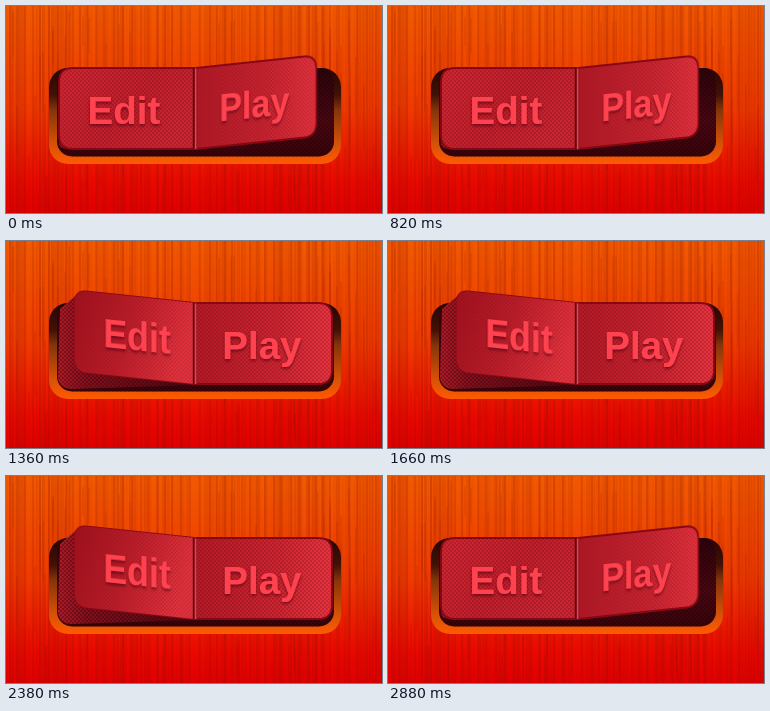
An HTML page that plays this animation: 376x207 px, repeating every 2900 ms.

```html
<!DOCTYPE html>
<html lang="en">
<head>
<meta charset="utf-8">
<title>Rocker switch</title>
<style>
  html, body { margin: 0; width: 100%; height: 100%; overflow: hidden; background: #e43000; }
  svg { display: block; width: 376px; height: 207px; }
  text { font: bold 38.5px "Liberation Sans", Arial, sans-serif; fill: #ff4350; }
  .face { stroke: #8c0714; stroke-width: 1.8; }
  .left, .right, .side, .leftText, .lit { animation: 2.9s infinite; }
  .left { transform-origin: 188.5px 102.5px; animation-name: left; }
  .right { transform-origin: 190px 102.5px; animation-name: right; }
  .side { animation-name: side; }
  .leftText { transform-origin: 82px 118px; animation-name: leftText; }
  .lit { animation-name: show; }

  /* The switch rocks over at 1260 ms and back at 2760 ms, 100 ms each */
  @keyframes left {
    0%, 43.45%, 98.62%, 100% { transform: matrix(1, 0, 0, 1, 0, 0); }
    46.9%, 95.17% { transform: matrix(.885, .094, 0, 1, 0, 0); }
  }
  @keyframes right {
    0%, 43.45%, 98.62%, 100% { transform: matrix(.885, -.094, 0, 1, 0, 0); }
    46.9%, 95.17% { transform: matrix(1, 0, 0, 1, 0, 0); }
  }
  @keyframes side {
    0%, 43.45%, 98.62%, 100% { d: path("M62 62 L53 70 L53 136 Q53 143 62 143 L188 143 L188 62 Z"); }
    46.9%, 95.17% { d: path("M74 51 L54 68 L52 136 Q53 148 66 148 L188 144 L188 62 Z"); }
  }
  @keyframes leftText {
    0%, 43.45%, 98.62%, 100% { transform: translate(0, 0) scale(1); }
    46.9%, 95.17% { transform: translate(4px, -2.5px) scale(1.05); }
  }
  @keyframes show {
    0%, 43.45%, 98.62%, 100% { opacity: 0; }
    46.9%, 95.17% { opacity: 1; }
  }
</style>
</head>
<body>
<svg viewBox="0 0 376 207">
  <defs>
    <linearGradient id="sky" x2="0" y2="1">
      <stop stop-color="#f25a00"/>
      <stop offset=".5" stop-color="#f03a00"/>
      <stop offset=".85" stop-color="#ea0800"/>
      <stop offset="1" stop-color="#e00000"/>
    </linearGradient>
    <linearGradient id="frame" x2="0" y2="1">
      <stop stop-color="#260603"/>
      <stop offset=".28" stop-color="#421106"/>
      <stop offset=".44" stop-color="#84350a"/>
      <stop offset=".8" stop-color="#d85206"/>
      <stop offset="1" stop-color="#ff5a00"/>
    </linearGradient>
    <linearGradient id="well" x2="0" y2="1">
      <stop stop-color="#2c030a"/>
      <stop offset=".6" stop-color="#4a0711"/>
      <stop offset="1" stop-color="#38030a"/>
    </linearGradient>
    <linearGradient id="red" x2="1" y2=".5">
      <stop stop-color="#ce2733"/>
      <stop offset=".6" stop-color="#c01f2c"/>
      <stop offset="1" stop-color="#c82632"/>
    </linearGradient>
    <linearGradient id="redRight" x2="1" y2="0">
      <stop stop-color="#b41a27"/>
      <stop offset=".6" stop-color="#cb2531"/>
      <stop offset="1" stop-color="#e6343f"/>
    </linearGradient>
    <linearGradient id="tilt" x2="1" y2=".2">
      <stop stop-color="#a4121e"/>
      <stop offset=".5" stop-color="#bf1e2a"/>
      <stop offset="1" stop-color="#e6343f"/>
    </linearGradient>
    <linearGradient id="flank" x2="1" y2="0">
      <stop stop-color="#b01a26"/>
      <stop offset=".2" stop-color="#84101b"/>
      <stop offset="1" stop-color="#4e0610"/>
    </linearGradient>
    <pattern id="dots" width="4" height="4" patternUnits="userSpaceOnUse">
      <path d="M0 0h2v2H0zM2 2h2v2H2z" fill="#50000a" opacity=".2"/>
    </pattern>
    <pattern id="darkDots" width="4" height="4" patternUnits="userSpaceOnUse">
      <path d="M0 0h2v2H0zM2 2h2v2H2z" fill="#180006" opacity=".3"/>
    </pattern>
    <filter id="drop" x="-20%" y="-20%" width="140%" height="150%">
      <feDropShadow dx="0" dy="2" stdDeviation="1.4" flood-color="#50000c" flood-opacity=".65"/>
    </filter>
    <path id="leftShape" d="M188.5 62 V143 H67 Q53 143 53 129 V76 Q53 62 67 62 Z"/>
    <path id="rightShape" d="M190 62 V143 H312 Q326 143 326 129 V76 Q326 62 312 62 Z"/>
  </defs>

  <rect width="376" height="207" fill="url(#sky)"/>
  <g id="grain" fill="#801000"></g>

  <rect x="43" y="62" width="292" height="96" rx="19" fill="url(#frame)"/>
  <rect x="51" y="62" width="277" height="88.5" rx="15" fill="url(#well)"/>
  <rect x="51" y="62" width="277" height="88.5" rx="15" fill="url(#darkDots)"/>

  <path class="side" fill="url(#flank)" d="M62 62 L53 70 L53 136 Q53 143 62 143 L188 143 L188 62 Z"/>
  <path class="side" fill="url(#darkDots)" d="M62 62 L53 70 L53 136 Q53 143 62 143 L188 143 L188 62 Z"/>

  <g class="left">
    <use href="#leftShape" class="face" fill="url(#red)"/>
    <use href="#leftShape" class="lit" fill="url(#tilt)"/>
    <use href="#leftShape" fill="url(#dots)"/>
    <text class="leftText" x="81.5" y="118" filter="url(#drop)">Edit</text>
  </g>
  <g class="right">
    <use href="#rightShape" class="face" fill="url(#redRight)"/>
    <use href="#rightShape" fill="url(#dots)"/>
    <text x="216.3" y="118" filter="url(#drop)">Play</text>
  </g>

  <path d="M187.7 62V143" stroke="#5a0510" stroke-width="1.8"/>
  <path d="M189.6 62.5V143" stroke="#ee5560" stroke-width="1.6" opacity=".85"/>
</svg>
<script>
  // Vertical wood grain from a seeded generator
  let seed = 17;
  const random = () => (seed = (seed * 16807) % 2147483647) / 2147483647;
  const grain = document.getElementById("grain");

  function streak(x, y, w, h, opacity) {
    const rect = document.createElementNS("http://www.w3.org/2000/svg", "rect");
    const attrs = { x, y, width: w, height: h, opacity };
    for (const key in attrs) rect.setAttribute(key, attrs[key]);
    grain.append(rect);
  }

  for (let x = 0; x < 376; x += 3) streak(x, 0, 2 + random() * 2, 207, random() * 0.16);
  for (let x = 3; x < 376; x += 7 + Math.floor(random() * 4)) streak(x, 0, 2, 207, 0.15);
  for (let i = 0; i < 90; i++) {
    streak(Math.floor(random() * 376), random() * 180, 2, 20 + random() * 60, 0.1);
  }
</script>
</body>
</html>
```
